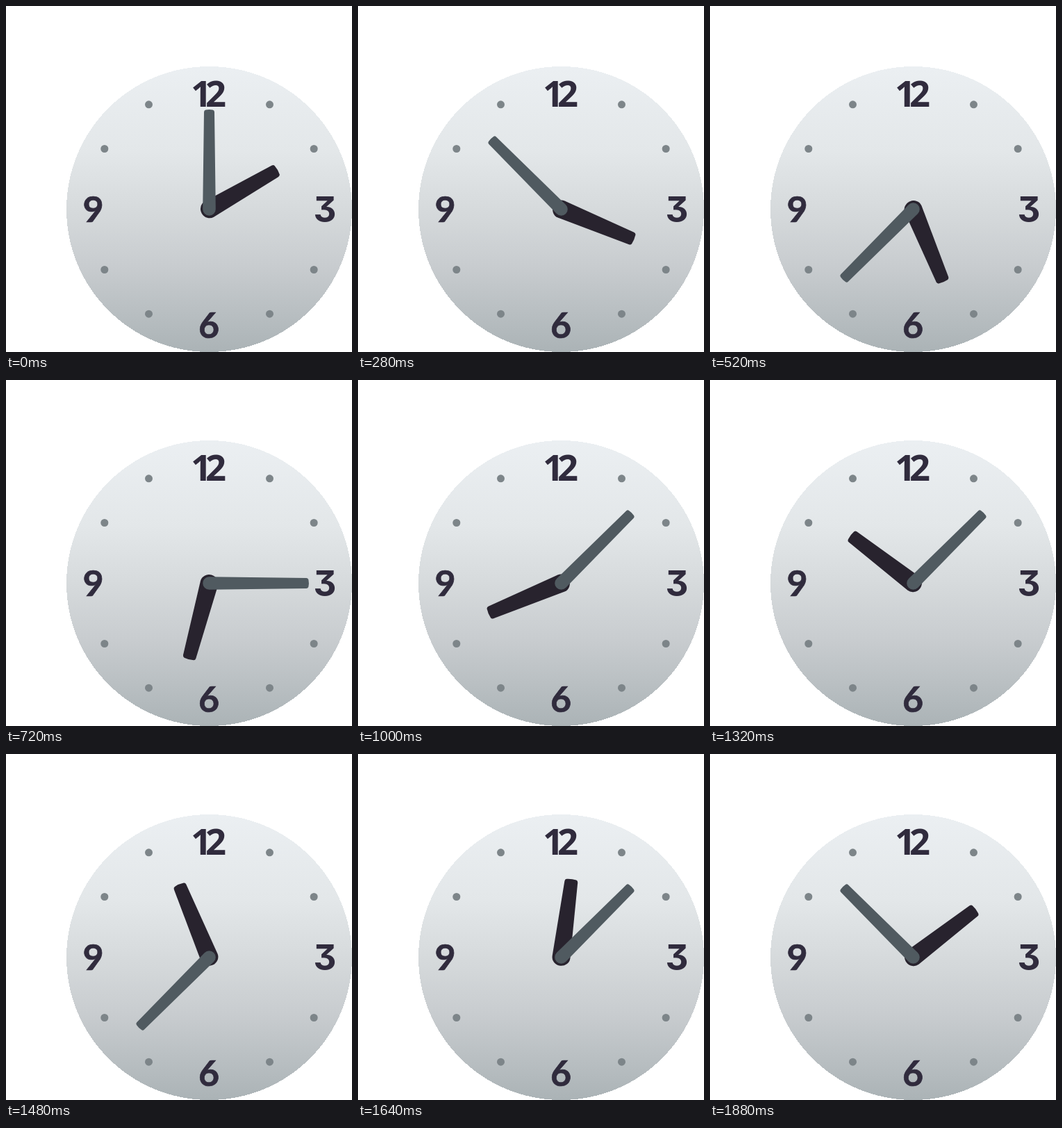
An HTML page for the animation above (1.92 s loop, 498 by 498 pixels).

```html
<!DOCTYPE html>
<html lang="en">
<head>
<meta charset="utf-8">
<title>Clock</title>
<style>
  html, body { margin: 0; width: 100%; height: 100%; overflow: hidden; background: #fff; }
  svg { display: block; width: 100%; height: 100%; }
  text { fill: #302b3d; font-weight: 700; }
  .twelve { font: 700 52.5px "Open Sans", "Noto Sans", sans-serif; letter-spacing: -9px; }
  .three { font: 700 51px Inter, sans-serif; font-feature-settings: "cv09"; }
  .round { font: 700 52px Lato, sans-serif; stroke: #302b3d; stroke-width: .7px; }
</style>
</head>
<body>
<svg viewBox="0 0 498 498">
  <defs>
    <linearGradient id="shade" x1="0" y1="0" x2="0" y2="1">
      <stop offset="0" stop-color="#ebeff2"/>
      <stop offset=".3" stop-color="#e3e7e9"/>
      <stop offset=".5" stop-color="#d6dadc"/>
      <stop offset=".7" stop-color="#c8cccf"/>
      <stop offset="1" stop-color="#abb3b6"/>
    </linearGradient>
  </defs>
  <circle cx="292.5" cy="292.5" r="205.5" fill="url(#shade)" shape-rendering="crispEdges"/>
  <g id="dots" fill="#7d8589"></g>
  <text class="twelve" x="266" y="144.5">12</text>
  <text class="three" x="459" y="310.5" text-anchor="middle">3</text>
  <text class="round" x="292" y="477.5" text-anchor="middle">6</text>
  <text class="round" x="125.5" y="310.5" text-anchor="middle">9</text>
  <path id="hour" fill="#28232e"
    d="M-13 0L-9.5-109.5Q-9.3-112.3-7-112.8Q0-114.2 7-112.8Q9.3-112.3 9.5-109.5L13 0A13 12.3 0 0 1-13 0Z"/>
  <path id="minute" fill="#505a60"
    d="M-9.3 0L-7.5-140Q-7.4-142.4-5-142.9Q0-143.9 5-142.9Q7.4-142.4 7.5-140L9.3 0A9.3 9.3 0 0 1-9.3 0Z"/>
</svg>
<script>
  const CENTER = 292.5, DOT_ORBIT = 174;
  const LOOP = 1920, TICK = 40;
  const byId = id => document.getElementById(id);
  const hour = byId("hour"), minute = byId("minute"), dots = byId("dots");

  for (let i = 0; i < 12; i++) {
    if (i % 3 === 0) continue;
    const angle = i * Math.PI / 6;
    const dot = document.createElementNS("http://www.w3.org/2000/svg", "circle");
    dot.setAttribute("cx", CENTER + DOT_ORBIT * Math.sin(angle));
    dot.setAttribute("cy", CENTER - DOT_ORBIT * Math.cos(angle));
    dot.setAttribute("r", 5.5);
    dots.append(dot);
  }

  const point = (hand, degrees) =>
    hand.setAttribute("transform", `translate(${CENTER} ${CENTER}) rotate(${degrees % 360})`);

  // Both hands move in discrete ticks: one hour turn and six minute turns per loop.
  function render(ms) {
    const tick = Math.floor((ms % LOOP) / TICK);
    point(hour, 60 + tick * 7.5);
    point(minute, tick * 45);
  }

  const start = performance.now();
  function loop() {
    render(performance.now() - start);
    requestAnimationFrame(loop);
  }
  loop();
</script>
</body>
</html>
```
